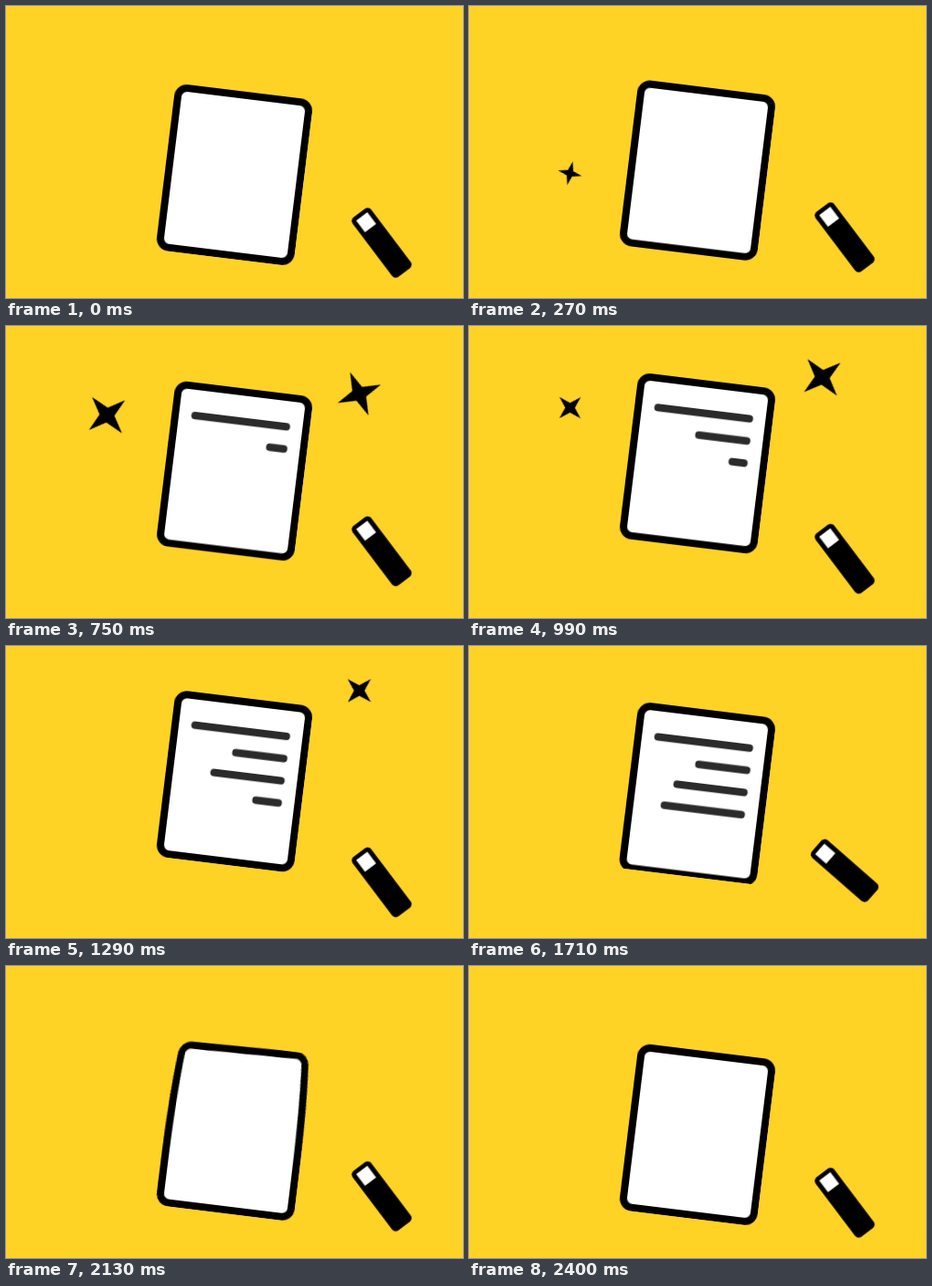
An HTML page without scripts for the animation above (2430 ms loop, 500 by 320 pixels).

```html
<!DOCTYPE html>
<html lang="en">
<head>
<meta charset="utf-8">
<title>Magic page</title>
<style>
  :root { --loop: 2430ms; --ink: #2b2b2b; --sine: cubic-bezier(.37, 0, .63, 1); }
  html, body { margin: 0; width: 100%; height: 100%; overflow: hidden; background: #ffd226; }
  .stage { position: relative; width: 500px; height: 320px; overflow: hidden; }
  .stage svg { position: absolute; left: 0; top: 0; }

  /* Page */
  .float { position: absolute; left: 174px; top: 93px; animation: float var(--loop) var(--sine) infinite; }
  .page { position: relative; width: 152px; height: 184px; rotate: 7deg; }
  .page svg { width: 152px; height: 184px; color: var(--ink); }
  .flat { animation: flat var(--loop) step-end infinite; }
  .stretch { transform-origin: 0 0; animation: stretch var(--loop) ease-in-out infinite; }
  .text { fill: none; stroke: currentColor; stroke-width: 8.2px; stroke-linecap: round; }
  .lines { animation: lines var(--loop) step-end infinite; }
  .lines use { opacity: 0; stroke-dasharray: 1 2; animation: draw var(--loop) var(--d) infinite; }
  .twist { position: absolute; inset: 0; opacity: 0; animation: twisting var(--loop) step-end infinite; }
  .twist svg {
    clip-path: inset(calc(var(--i) * 4px) 0 calc(179.4px - var(--i) * 4px) 0);
    animation: twist var(--loop) calc((45 - var(--i)) * 2.1ms) infinite;
  }

  @keyframes float { 50% { transform: translateY(-37px); } }
  @keyframes stretch {
    0%, 50%, 79%, 100% { transform: scaleY(1); }
    20%, 31% { transform: scaleY(.992); }
    70.4% { transform: scaleY(1.014); }
  }
  @keyframes flat { 0%, 92% { opacity: 1; } 71% { opacity: 0; } }
  @keyframes twisting { 0%, 92% { opacity: 0; } 71% { opacity: 1; } }
  @keyframes lines { 0%, 80% { opacity: 0; } 8% { opacity: 1; } }
  @keyframes draw {
    0% { stroke-dashoffset: 1; opacity: 1; animation-timing-function: ease-in-out; }
    14.8% { stroke-dashoffset: 0; }
    60% { opacity: 1; }
    60.1%, 100% { stroke-dashoffset: 0; opacity: 0; }
  }
  /* Each strip turns over a little after the one below it */
  @keyframes twist {
    0%, 70.37% { transform: translate(0, 0) rotateY(0deg) skewY(0deg); animation-timing-function: ease-in; }
    75.21% { transform: translate(2.5px, 0) rotateY(32deg) skewY(-2.9deg); animation-timing-function: linear; }
    77.11% { transform: translate(1px, 0) rotateY(60deg) skewY(0deg); animation-timing-function: linear; }
    79.01% { transform: translate(-1px, 3px) rotateY(90deg) skewY(7deg); animation-timing-function: linear; }
    82.82% { transform: translate(0, 0) rotateY(148deg) skewY(2deg); animation-timing-function: ease-out; }
    87.65%, 100% { transform: translate(0, 0) rotateY(180deg) skewY(0deg); }
    0%, 79% { color: var(--ink); }
    79.02%, 100% { color: #fff; }
  }

  /* Wand */
  .wand { animation: hover calc(var(--loop) / 2) var(--sine) infinite; }
  .flick { animation: flick var(--loop) infinite; }
  @keyframes hover { 50% { transform: translateY(-14.5px); } }
  @keyframes flick {
    0%, 67.5% { transform: rotate(0deg); animation-timing-function: ease-in-out; }
    74.5% { transform: rotate(-33deg); animation-timing-function: ease-in-out; }
    81.3%, 100% { transform: rotate(0deg); }
  }

  /* Stars */
  .rise { animation: rise var(--loop) var(--d) infinite backwards; }
  .spin { animation: spin var(--loop) var(--d) infinite backwards; }
  .left { --d: 200ms; --turn: 36deg; }
  .right { --d: 396ms; --turn: 70deg; }
  .left .pop { animation: pop-short var(--loop) var(--d) infinite backwards; }
  .right .pop { animation: pop-long var(--loop) var(--d) infinite backwards; }
  @keyframes rise {
    0% { transform: translateY(133px); animation-timing-function: cubic-bezier(.15, .7, .3, 1); }
    44%, 100% { transform: translateY(0); }
  }
  @keyframes spin {
    0% { transform: rotate(var(--turn)); animation-timing-function: cubic-bezier(.15, .7, .3, 1); }
    44%, 100% { transform: rotate(-46deg); }
  }
  @keyframes pop-short {
    0% { transform: scale(0); animation-timing-function: ease-out; }
    8.2% { transform: scale(1); }
    25% { transform: scale(1); animation-timing-function: ease-in; }
    39%, 100% { transform: scale(0); }
  }
  @keyframes pop-long {
    0% { transform: scale(0); animation-timing-function: ease-out; }
    8.2% { transform: scale(1); }
    30% { transform: scale(1); animation-timing-function: ease-in; }
    44%, 100% { transform: scale(0); }
  }
</style>
</head>
<body>
<div class="stage">
  <svg width="500" height="320" viewBox="0 0 500 320">
    <defs>
      <rect id="paper" x="4" y="4" width="144" height="176" rx="10" fill="#fff" stroke="#000" stroke-width="8"/>
      <path id="line1" pathLength="1" d="M126.3 36.2h-100.6"/>
      <path id="line2" pathLength="1" d="M126.3 60.7h-52.6"/>
      <path id="line3" pathLength="1" d="M126.3 85.2h-73.6"/>
      <path id="line4" pathLength="1" d="M126.3 109.7h-84.6"/>
      <g id="sheet">
        <use href="#paper"/>
        <g class="text">
          <use href="#line1"/><use href="#line2"/><use href="#line3"/><use href="#line4"/>
        </g>
      </g>
      <path id="star" d="M0-25.7L5.8-5.8 25.7 0 5.8 5.8 0 25.7-5.8 5.8-25.7 0-5.8-5.8z"/>
    </defs>

    <g class="left" transform="translate(110.5 87.2)">
      <g class="rise"><g class="spin"><use class="pop" href="#star"/></g></g>
    </g>
    <g class="right" transform="translate(386.5 48)">
      <g class="rise"><g class="spin"><use class="pop" href="#star"/></g></g>
    </g>

    <g class="wand">
      <g transform="translate(411 259.5)">
        <g class="flick">
          <g transform="rotate(53)">
            <rect x="-40.8" y="-12.8" width="81.6" height="25.6" rx="5"/>
            <rect x="-36.2" y="-7.6" width="16" height="15.2" fill="#fff"/>
          </g>
        </g>
      </g>
    </g>
  </svg>

  <div class="float"><div class="page">
    <svg class="flat">
      <use class="stretch" href="#paper"/>
      <g class="text lines">
        <use href="#line1" style="--d:300ms"/>
        <use href="#line2" style="--d:617ms"/>
        <use href="#line3" style="--d:887ms"/>
        <use href="#line4" style="--d:1157ms"/>
      </g>
    </svg>
    <div class="twist">
      <svg style="--i:0"><use href="#sheet"/></svg>
      <svg style="--i:1"><use href="#sheet"/></svg>
      <svg style="--i:2"><use href="#sheet"/></svg>
      <svg style="--i:3"><use href="#sheet"/></svg>
      <svg style="--i:4"><use href="#sheet"/></svg>
      <svg style="--i:5"><use href="#sheet"/></svg>
      <svg style="--i:6"><use href="#sheet"/></svg>
      <svg style="--i:7"><use href="#sheet"/></svg>
      <svg style="--i:8"><use href="#sheet"/></svg>
      <svg style="--i:9"><use href="#sheet"/></svg>
      <svg style="--i:10"><use href="#sheet"/></svg>
      <svg style="--i:11"><use href="#sheet"/></svg>
      <svg style="--i:12"><use href="#sheet"/></svg>
      <svg style="--i:13"><use href="#sheet"/></svg>
      <svg style="--i:14"><use href="#sheet"/></svg>
      <svg style="--i:15"><use href="#sheet"/></svg>
      <svg style="--i:16"><use href="#sheet"/></svg>
      <svg style="--i:17"><use href="#sheet"/></svg>
      <svg style="--i:18"><use href="#sheet"/></svg>
      <svg style="--i:19"><use href="#sheet"/></svg>
      <svg style="--i:20"><use href="#sheet"/></svg>
      <svg style="--i:21"><use href="#sheet"/></svg>
      <svg style="--i:22"><use href="#sheet"/></svg>
      <svg style="--i:23"><use href="#sheet"/></svg>
      <svg style="--i:24"><use href="#sheet"/></svg>
      <svg style="--i:25"><use href="#sheet"/></svg>
      <svg style="--i:26"><use href="#sheet"/></svg>
      <svg style="--i:27"><use href="#sheet"/></svg>
      <svg style="--i:28"><use href="#sheet"/></svg>
      <svg style="--i:29"><use href="#sheet"/></svg>
      <svg style="--i:30"><use href="#sheet"/></svg>
      <svg style="--i:31"><use href="#sheet"/></svg>
      <svg style="--i:32"><use href="#sheet"/></svg>
      <svg style="--i:33"><use href="#sheet"/></svg>
      <svg style="--i:34"><use href="#sheet"/></svg>
      <svg style="--i:35"><use href="#sheet"/></svg>
      <svg style="--i:36"><use href="#sheet"/></svg>
      <svg style="--i:37"><use href="#sheet"/></svg>
      <svg style="--i:38"><use href="#sheet"/></svg>
      <svg style="--i:39"><use href="#sheet"/></svg>
      <svg style="--i:40"><use href="#sheet"/></svg>
      <svg style="--i:41"><use href="#sheet"/></svg>
      <svg style="--i:42"><use href="#sheet"/></svg>
      <svg style="--i:43"><use href="#sheet"/></svg>
      <svg style="--i:44"><use href="#sheet"/></svg>
      <svg style="--i:45"><use href="#sheet"/></svg>
    </div>
  </div></div>
</div>
</body>
</html>
```
